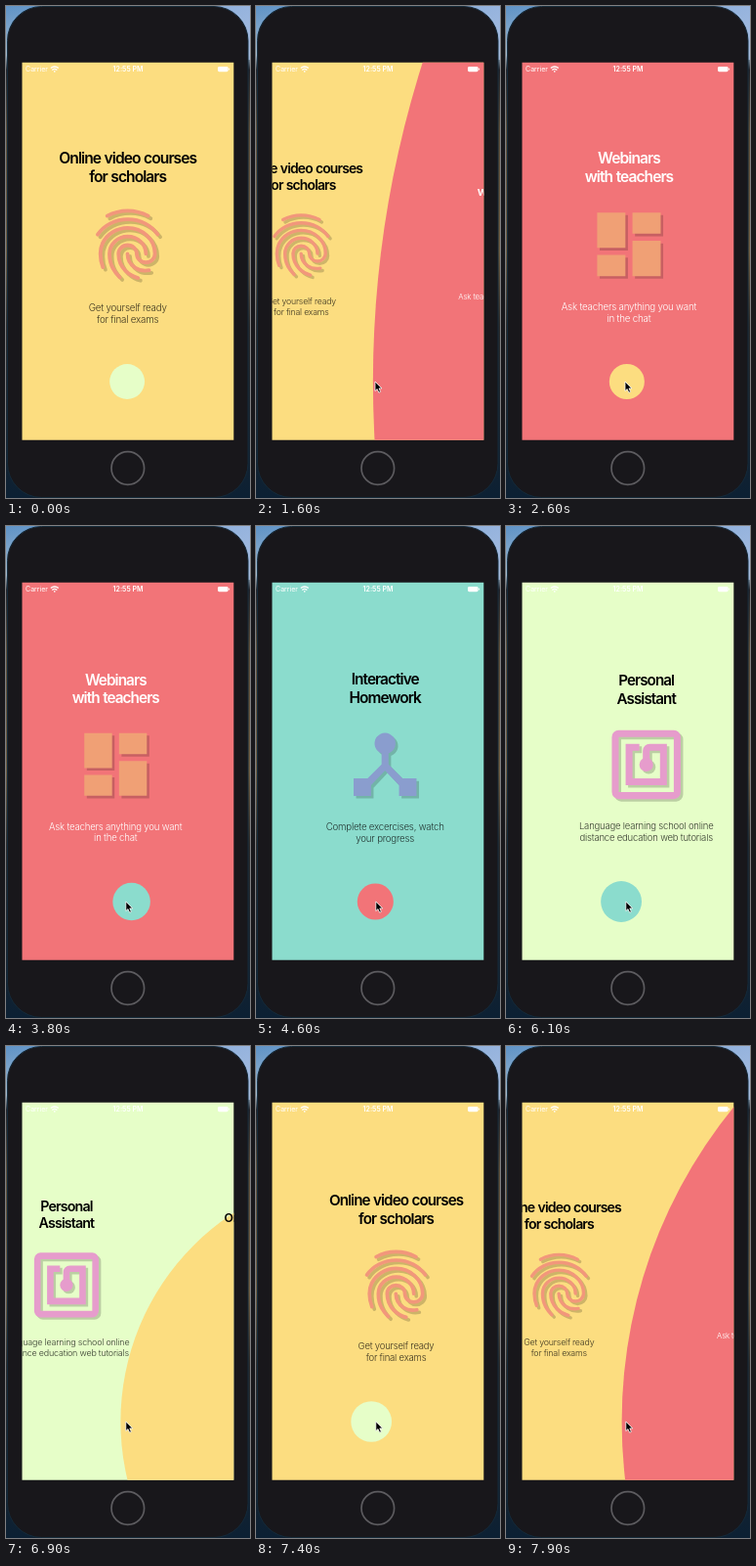
Animation, 250 px wide and 503 px high, one loop 8000 ms. Source, as an HTML page:

```html
<!DOCTYPE html>
<html lang="en">
<head>
<meta charset="utf-8">
<title>Onboarding</title>
<style>
  html, body { margin: 0; width: 100%; height: 100%; overflow: hidden; background: #18171b; }
  svg { display: block; width: 250px; height: 503px; }
  text { font-family: Inter, Roboto, sans-serif; text-anchor: middle; }
  .title { font-size: 15.6px; font-weight: 600; letter-spacing: -.95px; word-spacing: .6px; }
  .body { font-size: 9.8px; font-weight: 300; letter-spacing: -.22px; }
  .status { font-size: 7px; fill: #fff; }
</style>
</head>
<body>
<svg viewBox="0 0 250 503">
  <defs>
    <linearGradient id="desk" x2="0" y2="1">
      <stop offset="0" stop-color="#5f93c6"/>
      <stop offset=".1" stop-color="#9db6cc"/>
      <stop offset=".13" stop-color="#22242a"/>
      <stop offset=".25" stop-color="#5a4c38"/>
      <stop offset=".5" stop-color="#6e5c40"/>
      <stop offset=".65" stop-color="#2a2a2a"/>
      <stop offset="1" stop-color="#0c2033"/>
    </linearGradient>
    <linearGradient id="glow">
      <stop offset="0" stop-color="#a9bfe6" stop-opacity="0"/>
      <stop offset="1" stop-color="#a9bfe6" stop-opacity=".75"/>
    </linearGradient>
    <clipPath id="screen"><rect x="16.5" y="57.7" width="216.8" height="386"/></clipPath>
    <g id="finger" fill="none" stroke="currentColor" stroke-width="1.05" stroke-linecap="round">
      <path d="M6.2 3.97C8 3 9.9 2.5 12 2.5s3.9.45 5.8 1.47"/>
      <path d="M3.5 9.22C4.4 7.9 5.6 6.85 7.07 6.1c3-1.55 6.9-1.55 9.86 0 1.45.75 2.65 1.8 3.57 3.1"/>
      <path d="M9.75 21.29c-.8-.8-1.28-1.3-1.93-2.5-.65-1.15-.98-2.57-.98-4.13 0-2.7 2.3-4.89 5.16-4.89s5.16 2.2 5.16 4.89"/>
      <path d="M11.94 14.66c0 1.57.8 3.06 2.16 3.97.78.53 1.73.8 2.82.8.3 0 .7-.03 1.12-.1"/>
      <path d="M14.91 21.5c-1.5-.4-2.5-1-3.5-1.98-1.3-1.3-2.02-3-2.02-4.86 0-1.34 1.15-2.44 2.58-2.44s2.58 1.1 2.58 2.44 1.15 2.44 2.58 2.44 2.58-1.1 2.58-2.44c0-4.05-3.48-7.33-7.75-7.33-3.03 0-5.81 1.69-7.06 4.31-.43.9-.64 1.92-.64 3.02 0 .85.08 2.15.72 3.78"/>
    </g>
    <path id="tiles" fill="currentColor" d="M3 3h8v10H3zM3 15h8v6H3zM13 3h8v6h-8zM13 11h8v10h-8z"/>
    <path id="hub" fill="currentColor" d="M17 16l-4-4V8.82A3 3 0 1 0 11 8.82V12l-4 4H3v5h5v-3.05l4-4.2 4 4.2V21h5v-5z"/>
    <g id="tag" fill="none" stroke="currentColor" stroke-width="2">
      <rect x="3" y="3" width="18" height="18" rx="1"/>
      <path d="M10 7H7v10h10V7h-4a1 1 0 0 0-1 1v4"/>
      <circle cx="12" cy="12" r="2" fill="currentColor" stroke="none"/>
    </g>
  </defs>

  <rect width="250" height="503" fill="url(#desk)"/>
  <rect width="250" height="55" fill="url(#glow)"/>
  <rect x="1.5" y=".5" width="246.5" height="502" rx="35" fill="#18171b" stroke="#142a3a"/>
  <circle cx="124.8" cy="472.5" r="16.8" fill="none" stroke="#5c5b5f" stroke-width="1.7"/>

  <g clip-path="url(#screen)">
    <rect id="back" x="16" y="57" width="218" height="388"/>
    <circle id="disc"/>
    <g id="pages"></g>
    <text class="status" x="31.5" y="67.3">Carrier</text>
    <text class="status" x="125" y="67.3" font-weight="600">12:55 PM</text>
    <g fill="none" stroke="#fff" stroke-width="1.3">
      <path d="M45.8 63.6q4-3.2 8 0M47.3 65.4q2.5-2 5 0"/>
      <circle cx="49.8" cy="66.9" r=".8" fill="#fff" stroke="none"/>
    </g>
    <rect x="217" y="62" width="10.6" height="5.2" rx="1.4" fill="#fff"/>
    <rect x="228.1" y="63.6" width="1" height="2" rx=".5" fill="#fff"/>
  </g>
  <path id="cursor" d="M0 0v9.6l2.2-2 1.6 3.6 1.8-.8-1.6-3.5h3z" fill="#000" stroke="#fff" stroke-width=".8"/>
</svg>

<script>
const LOOP = 8000, PAGE_WIDTH = 217, CX = 124.7, CY = 251;
const BUTTON_Y = 384, UNIT = PAGE_WIDTH / 375, BUTTON_R = 30 * UNIT;
const TAPS = [1390, 3737, 5425, 6723, 7707];
const STIFFNESS = 6;
const DARK = { title: '#000', body: '#000000bf' };
const LIGHT = { title: '#fff', body: '#fff' };

const PAGES = [
  { color: '#fcdd80', ink: DARK, icon: 'finger', tint: '#f2977b',
    title: ['Online video courses', 'for scholars'],
    body: ['Get yourself ready', 'for final exams'] },
  { color: '#f27478', ink: LIGHT, icon: 'tiles', tint: '#f0a075',
    title: ['Webinars', 'with teachers'],
    body: ['Ask teachers anything you want', 'in the chat'] },
  { color: '#8bdccd', ink: DARK, icon: 'hub', tint: '#8a9dce',
    title: ['Interactive', 'Homework'],
    body: ['Complete excercises, watch', 'your progress'] },
  { color: '#e6fec8', ink: DARK, icon: 'tag', tint: '#e69ccc',
    title: ['Personal', 'Assistant'],
    body: ['Language learning school online', 'distance education web tutorials'] }
];

const el = id => document.getElementById(id);
const set = (node, attrs) => {
  for (const key in attrs) node.setAttribute(key, attrs[key]);
};
const back = el('back'), disc = el('disc'), cursor = el('cursor');

const lines = (page, kind, y, step) => page[kind].map((text, i) =>
  `<text class="${kind}" fill="${page.ink[kind]}" x="${CX}" y="${y + i * step}">${text}</text>`).join('');

const icon = (page, shift, style) =>
  `<use href="#${page.icon}" style="${style}"
    transform="translate(${CX + shift} ${243.7 + shift}) scale(3.62) translate(-12 -12)"/>`;

el('pages').innerHTML = PAGES.map(page => `<g>
  ${lines(page, 'title', 161, 19)}
  ${icon(page, 2.6, 'color:#000;opacity:.18')}
  ${icon(page, 0, 'color:' + page.tint)}
  ${lines(page, 'body', 311.6, 12)}</g>`).join('');
const groups = [...el('pages').children];

function place(index, offset) {
  const scale = 1 - 0.3 * Math.abs(offset);
  set(groups[index], {
    visibility: 'visible',
    transform: `translate(${CX + offset * PAGE_WIDTH} ${CY}) scale(${scale}) translate(${-CX} ${-CY})`
  });
}

// Critically damped spring from 0 to 1
function spring(ms) {
  const x = STIFFNESS * ms / 1000;
  return 1 - (1 + x) * Math.exp(-x);
}

// The disc swells to a straight edge, flips sides, then shrinks back to the button
function drawDisc(progress, from, to) {
  const growing = progress < 0.5;
  const p = growing ? progress : 1 - progress;
  const r = UNIT * (30 + 2 ** (30 * p));
  const side = growing ? 1 : -1;
  const edge = CX - side * BUTTON_R * (1 - 2 * p);
  set(back, { fill: growing ? from.color : to.color });
  set(disc, { cx: edge + side * r, cy: BUTTON_Y, r, fill: growing ? to.color : from.color });
}

function drawCursor(t) {
  const u = Math.min(1, Math.max(0, (t - 600) / 600));
  const away = (1 - u) ** 3;
  const x = 122 + Math.min(1, Math.max(0, (t - 2700) / 500)) * 0.8 + away * 130;
  set(cursor, {
    visibility: u > 0 ? 'visible' : 'hidden',
    transform: `translate(${x} ${384 + away * 60})`
  });
}

function draw(t) {
  const count = TAPS.filter(tap => tap <= t).length;
  const progress = count ? spring(t - TAPS[count - 1]) : 1;
  const to = count % 4, from = (count + 3) % 4;
  groups.forEach(group => set(group, { visibility: 'hidden' }));
  place(from, -progress);
  place(to, 1 - progress);
  drawDisc(progress, PAGES[from], PAGES[to]);
  drawCursor(t);
}

const start = performance.now();
function tick() {
  draw((performance.now() - start) % LOOP);
  requestAnimationFrame(tick);
}
tick();
</script>
</body>
</html>
```
